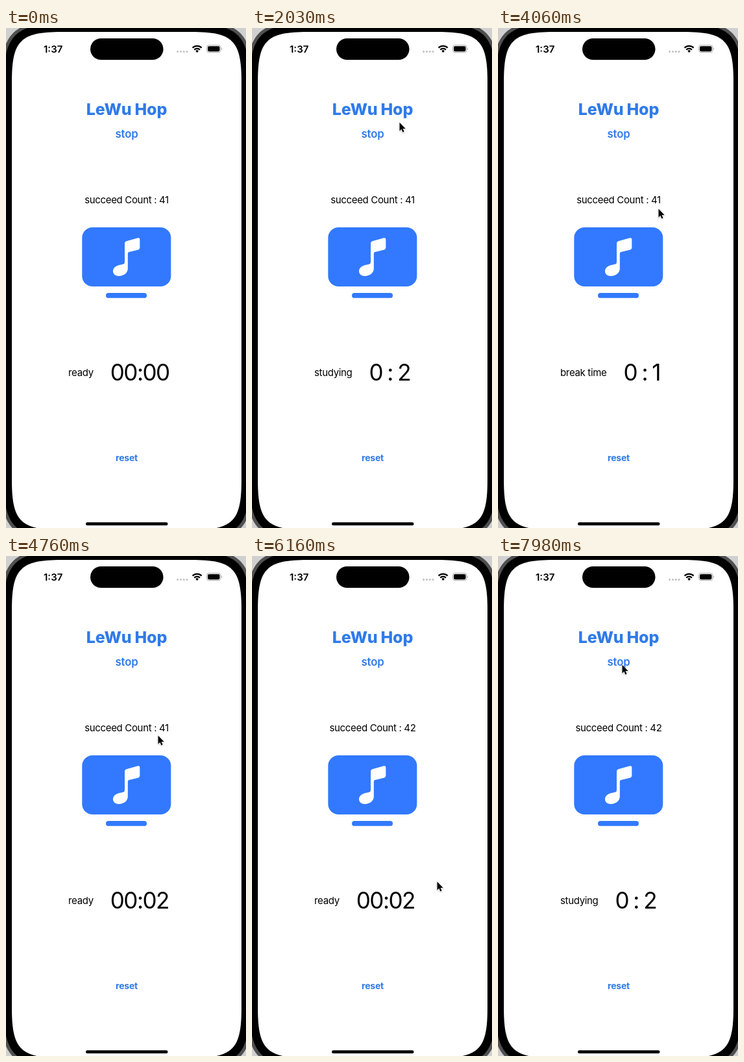
Recreate the animation shown at these times as an HTML page. Size 370 px wide and 770 px high, loop 8000 ms.

```html
<!DOCTYPE html>
<html lang="en">
<head>
<meta charset="utf-8">
<title>Study timer</title>
<style>
  html, body { margin: 0; width: 100%; height: 100%; overflow: hidden; background: #d0d0d0; }
  svg { display: block; width: 370px; height: 770px; }
  text { font-family: Inter, Roboto, sans-serif; }
  .mid { text-anchor: middle; }
  .blue { fill: #2f7bea; }
  .body { font-size: 15px; letter-spacing: -.33px; }
  .clock { font-size: 35px; letter-spacing: -1.5px; word-spacing: -1px; }
</style>
</head>
<body>
<svg viewBox="0 0 370 770">
  <path id="frame" fill="#505050"/>
  <path id="bezel"/>
  <path id="screen" fill="#fff"/>
  <rect x="130" y="16" width="112.5" height="33" rx="16.5"/>

  <text x="58" y="38" font-size="15" font-weight="600">1:37</text>
  <path d="M264.6 36.3h16" stroke="#c4c4c4" stroke-width="3.2" stroke-linecap="round" stroke-dasharray="0 4.8"/>
  <g fill="none" stroke="#000" stroke-width="2.2">
    <path d="M287.6 30.5a10 10 0 0 1 14 0M290.2 33.5a6.2 6.2 0 0 1 8.8 0"/>
    <path d="M292.3 35.3a3.2 3.2 0 0 1 4.6 0L294.6 38Z" fill="#000" stroke="none"/>
  </g>
  <rect x="309.5" y="26.5" width="21.5" height="11.2" rx="3.4" fill="none" stroke="#a6a6a6"/>
  <rect x="311" y="28" width="18.5" height="8.2" rx="2.1"/>
  <path d="M332.3 30.3q2 1.8 0 3.6z" fill="#a6a6a6"/>

  <text class="mid blue" x="186" y="133.5" font-size="25" font-weight="800" letter-spacing="-.2">LeWu Hop</text>
  <text class="mid blue" x="186" y="168.6" font-size="16.8" font-weight="600" letter-spacing="-.2">stop</text>
  <text class="mid body" id="count" x="186" y="270"></text>

  <g fill="#3279ff">
    <rect x="117.3" y="307" width="137" height="91" rx="16"/>
    <rect x="154" y="408" width="63" height="7.8" rx="3.9"/>
  </g>
  <path fill="#fff" d="M183 331.5Q183 329 185.5 328.3L203.5 323.3Q206.3 322.8 206.3 325.5V338.5Q206.3 340.8 204 341.4L189.5 345Q187.8 345.4 187.8 347.2V370.5C187.8 377 181.5 382 174 382C168.5 382 165 379 165 374.5C165 369 169.5 366.3 175 365L180.5 363.7Q183 363 183 360.5Z"/>

  <text x="96" y="536"><tspan class="body" id="state"></tspan><tspan class="clock" id="clock" dx="26" dy="7"></tspan></text>
  <text class="mid blue" x="186" y="667" font-size="14" font-weight="700" letter-spacing="-.2">reset</text>
  <rect x="123" y="761.3" width="126.5" height="4.7" rx="2.35"/>

  <path id="cursor" d="M.5 .5V13.5L3.4 10.8 5.4 15.5 7.5 14.6 5.5 10H9.6Z" stroke="#fff" paint-order="stroke"
        style="filter: drop-shadow(.5px 1px .8px #0004)"/>
</svg>
<script>
const LOOP = 8000, STEP = 70, SECOND = 1100;
const FIRST_RUN = 1330, SECOND_RUN = 7490, COUNTED = 5320;
const $ = id => document.getElementById(id);

// Key points of the pointer: time, x, y
const path = [
  [70, 163, 729], [280, 223, 125], [420, 201, 261], [770, 218, 143], [1120, 222, 132],
  [1890, 222, 132], [2730, 295, 301], [3430, 232, 262], [4060, 247, 278], [5460, 221, 274],
  [6090, 300, 470], [6370, 205, 667], [6860, 233, 240], [7560, 191, 172], [7980, 191, 167]
];

// Outline grown around the screen, with continuous corners
function outline(id, grow) {
  const r = 50 + grow, far = 1.53 * r, near = .27 * r;
  const left = 9 - grow, right = 363 + grow, top = 6 - grow, bottom = 773 + grow;
  const corner = (x, y, sx, sy, flip) => {
    const a = `${x} ${y + sy * far}`, b = `${x} ${y + sy * near}`;
    const c = `${x + sx * near} ${y}`, d = `${x + sx * far} ${y}`;
    return flip ? `L${d}C${c} ${b} ${a}` : `L${a}C${b} ${c} ${d}`;
  };
  const d = corner(left, top, 1, 1) + corner(right, top, -1, 1, true) +
            corner(right, bottom, -1, -1) + corner(left, bottom, 1, -1, true);
  $(id).setAttribute('d', 'M' + d.slice(1) + 'Z');
}

function pointAt(t) {
  const i = path.findIndex(p => p[0] >= t);
  const [t1, x1, y1] = path[i], [t0, x0, y0] = path[Math.max(0, i - 1)];
  const k = (t - t0) / (t1 - t0 || 1);
  const ease = k * k * (3 - 2 * k);
  return [x0 + (x1 - x0) * ease, y0 + (y1 - y0) * ease].map(Math.round);
}

// Two seconds of study, one of break, then ready again
function timerAt(t) {
  const tick = Math.floor((t - (t < SECOND_RUN ? FIRST_RUN : SECOND_RUN)) / SECOND);
  if (tick < 0) return ['ready', '00:00'];
  if (tick < 2) return ['studying', `0 : ${2 - tick}`];
  return tick < 3 ? ['break time', '0 : 1'] : ['ready', '00:02'];
}

function draw(now) {
  const t = Math.floor(now % LOOP / STEP) * STEP;
  [$('state').textContent, $('clock').textContent] = timerAt(t);

  const fade = Math.min(1, Math.max(0, (t - COUNTED) / 350));
  $('count').textContent = 'succeed Count : ' + (t < COUNTED ? 41 : 42);
  $('count').setAttribute('opacity', t < COUNTED ? 1 : 1 - (1 - fade) ** 2);

  $('cursor').setAttribute('visibility', t < STEP ? 'hidden' : 'visible');
  $('cursor').setAttribute('transform', `translate(${pointAt(t)})`);
}

outline('frame', 18);
outline('bezel', 13);
outline('screen', 0);

const start = performance.now();
function frame() {
  draw(performance.now() - start);
  requestAnimationFrame(frame);
}
frame();
</script>
</body>
</html>
```
